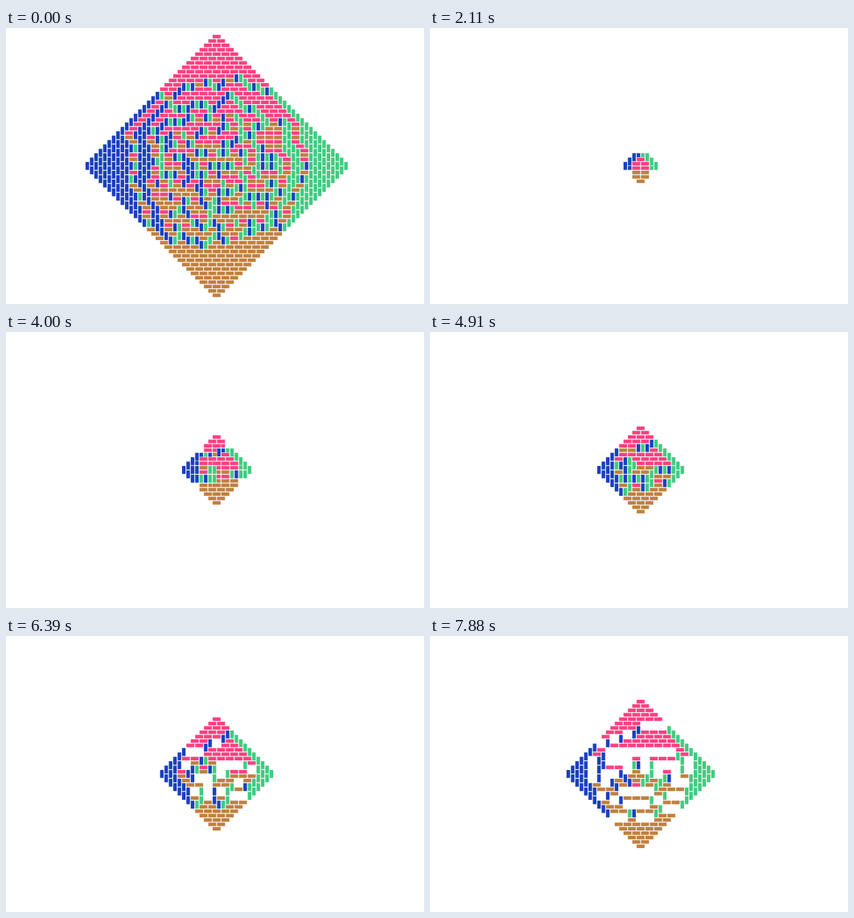
Recreate the animation shown at these times as an HTML page with a canvas. Size 615x406 px, loop 8 s.

```html
<!DOCTYPE html>
<html lang="en">
<head>
<meta charset="utf-8">
<title>Domino shuffling</title>
<style>
  html, body { margin: 0; width: 100%; height: 100%; overflow: hidden; background: #fff; }
  canvas { display: block; }
</style>
</head>
<body>
<canvas id="stage" width="615" height="406"></canvas>
<script>
const ctx = document.getElementById('stage').getContext('2d');
const LOOP = 8000, LAST = 30, ROUND = 444;
const CX = 309.92, CY = 202.92, CELL = 6.45, GAP = 1.2;
const COLORS = { north: '#ff4080', south: '#c08040', west: '#1a40c0', east: '#40cc80' };

let seed = 20;
const random = () => (seed = (seed * 1664525 + 1013904223) >>> 0) / 4294967296;

const key = (r, c) => r * 100 + c;

// Half the width of row r in the diamond of order n.
const halfWidth = (n, r) => r < 0 ? n + 1 + r : n - r;

// A domino keeps its travel direction for life.
const domino = (r, c, upright, step) => ({
  r, c, upright, step,
  kind: upright ? (step < 0 ? 'west' : 'east') : (step < 0 ? 'north' : 'south')
});

const move = list => list.map(d =>
  d.upright ? { ...d, c: d.c + d.step } : { ...d, r: d.r + d.step });

// Fill every empty 2x2 block with a pair that faces apart, turned by a coin flip.
function fill(list, n) {
  const out = [...list], used = new Set();
  for (const d of list) {
    used.add(key(d.r, d.c));
    used.add(d.upright ? key(d.r + 1, d.c) : key(d.r, d.c + 1));
  }
  for (let r = -n; r < n; r++) {
    const h = halfWidth(n, r);
    for (let c = -h; c < h; c++) {
      if (used.has(key(r, c))) continue;
      const upright = random() < 0.5;
      out.push(domino(r, c, upright, -1));
      out.push(upright ? domino(r, c + 1, true, 1) : domino(r + 1, c, false, 1));
      for (const dr of [0, 1]) for (const dc of [0, 1]) used.add(key(r + dr, c + dc));
    }
  }
  return out;
}

// Remove pairs that would run into each other.
function clear(list) {
  const at = new Map(list.map(d => [key(d.r, d.c), d]));
  return list.filter(d => {
    const other = at.get(d.upright ? key(d.r, d.c + d.step) : key(d.r + d.step, d.c));
    return !(other && other.upright === d.upright && other.step === -d.step);
  });
}

// rounds[n] = [moved, filled, cleared]
const rounds = [[[], [], []]];
for (let n = 1; n <= LAST; n++) {
  const moved = move(rounds[n - 1][2]);
  const filled = fill(moved, n);
  rounds.push([moved, filled, clear(filled)]);
}

function draw(list) {
  for (const d of list) {
    const x = CX + d.c * CELL, y = CY + d.r * CELL;
    const w = d.upright ? CELL : 2 * CELL, h = d.upright ? 2 * CELL : CELL;
    ctx.fillStyle = '#fff';
    ctx.fillRect(x, y, w, h);
    ctx.fillStyle = COLORS[d.kind];
    ctx.fillRect(x + GAP / 2, y + GAP / 2, w - GAP, h - GAP);
  }
}

function render(t) {
  ctx.fillStyle = '#fff';
  ctx.fillRect(0, 0, 615, 406);
  if (t < 710) return draw(rounds[LAST][1]);
  if (t < 1020) return;
  const u = 4 + (t - 2100) / ROUND;
  const n = Math.floor(u), part = u - n;
  const stage = part < 0.33 ? 0 : part < 0.64 ? 1 : 2;
  // Small diamonds slide over the previous tiling.
  if (stage === 0 && n <= 8) draw(rounds[n - 1][1]);
  draw(rounds[n][stage]);
}

const start = performance.now();
function tick() {
  render((performance.now() - start) % LOOP);
  requestAnimationFrame(tick);
}
tick();
</script>
</body>
</html>
```
